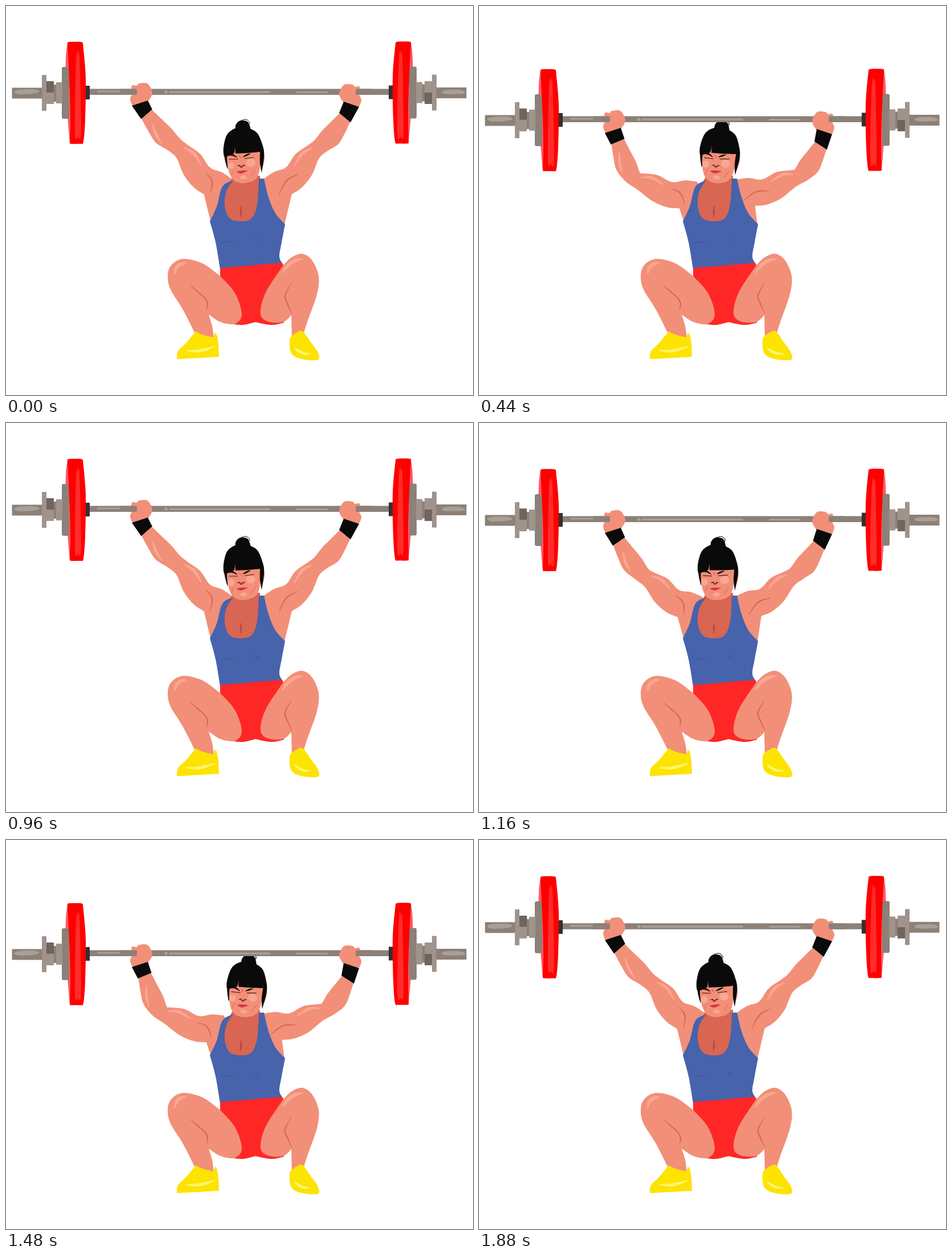
These frames come from a looping animation (820 px wide and 683 px high, 1920 ms). An HTML page with a canvas:

```html
<!DOCTYPE html>
<html lang="en">
<head>
<meta charset="utf-8">
<title>Weightlifter</title>
<style>
html, body { margin: 0; width: 100%; height: 100%; overflow: hidden; background: #fff; }
canvas { display: block; }
</style>
</head>
<body>
<canvas id="stage" width="820" height="683"></canvas>
<script>
const ctx = document.getElementById('stage').getContext('2d');
const LOOP = 1920, STEP = 40, PERIOD = 960, DROP = 48.8;

const SKIN = '#f28f78', SHADE = '#d86653', GLOW = '#f9a793', BLACK = '#0a0a0a';
const BLUE = '#4663ac', SHORTS = '#ff2726', SHOE = '#fde300', SHINE = '#fff46e';
const STEEL = '#8c8077', PALE = '#a0938c', DARK = '#6f655f', GLINT = '#a8a096';

const mix = (a, b, k) => a + (b - a) * k;
const mixPoint = (a, b, k) => [mix(a[0], b[0], k), mix(a[1], b[1], k)];

// "x y x y | x y": smooth runs, with a corner at each bar
const cache = {};
const parse = s => cache[s] || (cache[s] = s.split('|').map(run => {
  const n = run.trim().split(/\s+/).map(Number), pts = [];
  for (let i = 0; i < n.length; i += 2) pts.push([n[i], n[i + 1]]);
  return pts;
}));
const runsOf = shape => typeof shape === 'string' ? parse(shape) : shape;

function curve(path, p) {
  for (let i = 0; i < p.length - 1; i++) {
    const a = p[i - 1] || p[i], b = p[i], c = p[i + 1], d = p[i + 2] || c;
    path.bezierCurveTo(
      b[0] + (c[0] - a[0]) / 6, b[1] + (c[1] - a[1]) / 6,
      c[0] - (d[0] - b[0]) / 6, c[1] - (d[1] - b[1]) / 6, c[0], c[1]);
  }
}

function outline(shape) {
  const path = new Path2D();
  let last = null;
  for (const run of runsOf(shape)) {
    if (!last) path.moveTo(...run[0]);
    curve(path, last ? [last, ...run] : run);
    last = run[run.length - 1];
  }
  return path;
}

function fill(color, shape) {
  const path = outline(shape);
  path.closePath();
  ctx.fillStyle = color;
  ctx.fill(path);
}

function line(color, width, shape) {
  ctx.strokeStyle = color;
  ctx.lineWidth = width;
  ctx.lineCap = ctx.lineJoin = 'round';
  ctx.stroke(outline(shape));
}

// stroke that thins out at both ends
function brush(color, width, shape) {
  const p = runsOf(shape)[0], n = p.length - 1;
  const edge = sign => p.map((q, i) => {
    const u = p[Math.max(0, i - 1)], v = p[Math.min(n, i + 1)];
    const dx = v[0] - u[0], dy = v[1] - u[1];
    const w = sign * width / 2 * (i % n ? 1 : 0.35) / Math.hypot(dx, dy);
    return [q[0] - dy * w, q[1] + dx * w];
  });
  const back = edge(-1).reverse();
  fill(color, [edge(1), [back[0]], back]);
}

function box(color, x, y, w, h, r = 0) {
  ctx.fillStyle = color;
  ctx.beginPath();
  ctx.roundRect(x, y, w, h, r);
  ctx.fill();
}

function oval(color, x, y, rx, ry) {
  ctx.fillStyle = color;
  ctx.beginPath();
  ctx.ellipse(x, y, rx, ry, 0, 0, Math.PI * 2);
  ctx.fill();
}

// mirrors a drawing made for the left side
function flip(axis, dy, paint) {
  ctx.save();
  ctx.translate(axis, dy);
  ctx.scale(-1, 1);
  paint();
  ctx.restore();
}

// wrist, elbow and shoulder in the high and the low pose
const LEFT = {
  side: 1,
  high: [[247, 190], [300, 250], [385, 320]],
  low: [[243.5, 239], [272, 309], [379, 328]],
  cuff: [[221, 175], [249, 166]],
  chest: [400, 340], waist: [359, 377],
  crease: [[1.6, -1], [1.73, -3], [1.81, -11], [1.87, -24]]
};
const RIGHT = {
  side: -1,
  high: [[595, 196], [549, 251], [465, 319]],
  low: [[600, 246], [563, 303], [457, 324]],
  cuff: [[620, 177], [593, 168]],
  chest: [455, 350], waist: [489, 384],
  crease: [[1.52, -12], [1.68, -8], [1.8, -10], [1.97, -19]]
};
// distance along the arm (elbow at 1), thickness below and above the bone
const MUSCLE = [
  [0, 12, 12], [0.3, 17.5, 14], [0.6, 21, 16], [0.9, 14, 15.5], [1.1, 13.5, 17],
  [1.35, 28, 18.5], [1.6, 34, 11], [1.8, 32, 18], [2, 30, 20]
];

// maps arm coordinates (u along, v across) to the stage
function rig(arm, k) {
  const [w, e, s] = arm.high.map((p, i) => mixPoint(p, arm.low[i], k));
  const fore = Math.atan2(e[1] - w[1], e[0] - w[0]);
  const upper = Math.atan2(s[1] - e[1], s[0] - e[0]);
  return ([u, v]) => {
    const p = u < 1 ? mixPoint(w, e, u) : mixPoint(e, s, u - 1);
    const b = Math.min(1, Math.max(0, (u - 0.8) / 0.4));
    const a = mix(fore, upper, b * b * (3 - 2 * b));
    return [p[0] + Math.sin(a) * v * arm.side, p[1] - Math.cos(a) * v * arm.side];
  };
}

function drawArm(arm, k) {
  const at = rig(arm, k);
  const over = MUSCLE.map(([u, , up]) => at([u, up]));
  const under = MUSCLE.slice(0, -1).map(([u, down]) => at([u, -down])).reverse();
  fill(SKIN, [over, [arm.chest], [arm.waist], [under[0]], under]);
  brush(SHADE, 2.2, [arm.crease.map(at)]);
  brush(GLOW, 5.5, [[[1.08, 9], [1.26, 12], [1.48, 4]].map(at)]);
  if (arm === LEFT) brush(GLOW, 5, [[[0.24, -4], [0.46, -11], [0.71, -14]].map(at)]);
}

function drawBand(arm, k) {
  const at = rig(arm, k);
  const [a, b] = arm.cuff.map(([x, y]) => [x, y + DROP * k]);
  fill(BLACK, [[a], [b], [at([0, 13])], [at([0, -13])]]);
}

function torso() {
  fill(SHADE, '398 300 | 381 330 | 381 382 | 445 382 | 446 298');
  brush('#b44e40', 3.6, '413 351 412.5 361 412 370');
  fill(BLUE, '399 306 387 325 384 350 392 372 411 378 431 373 441 348 444 303 | 453 303 | 461 336 473 364 490 383 | 484 415 480 440 486 453 | 376 462 | 368 415 358 378 | 370 352 380 317 399 306');
  brush('#3d589f', 2, '378 415 390 414 401 411');
  brush('#3d589f', 2, '437 408 441 411 446 413');
}

function legs() {
  fill(SHORTS, '376 460 | 485 451 | 500 480 | 488 556 | 466 560 438 555 | 416 560 396 558 | 376 500');
  fill(SKIN, '376 474 345 452 312 444 291 454 284 473 289 498 310 532 333 577 | 365 584 | 362 562 356 542 | 377 555 402 558 414 541 402 504 376 474');
  fill(SKIN, '487 455 502 441 520 435 537 446 549 474 546 506 530 552 522 577 | 502 580 | 501 543 | 486 555 460 554 447 540 456 503 487 455');
  brush(SHADE, 2.2, '324 491 337 502 350 514 354 524 352 534');
  brush(SHADE, 2.2, '501 487 490 508 493 520 502 540');
  brush(GLOW, 6, '296 471 299 460 307 453 317 451');
  brush(GLOW, 6, '485 469 495 456 508 447 522 444');
}

function shoes() {
  fill(SHOE, '333 571 316 592 302 606 300 620 | 374 616 | 373 594 370 577 366 574 | 365 582 | 345 577 333 571');
  fill(SHOE, '503 578 498 586 501 610 520 620 548 621 547 607 535 590 521 571 511 573 503 578');
  brush(SHINE, 5, '316 605 335 606 350 603 367 598');
  brush(SHINE, 4.5, '506 600 514 606 523 610 535 611');
}

function face() {
  fill(SKIN, '448 258 453 258 454 267 452 279 448 289');
  fill(BLACK, '383 250 | 384 268 389 287 | 394 250');
  fill(SKIN, '388 250 | 389 280 398 304 417 311 440 302 447 275 447 246');
  oval(GLOW, 395, 280, 6, 6);
  oval(GLOW, 430, 275, 8, 7);
  oval(GLOW, 417, 301, 6, 3.5);
  brush(BLACK, 2.6, '393 262 399 262 406 266');
  brush(BLACK, 2.8, '416 265 422 262 429 259');
  line('#4a1c18', 1.2, '392 269 407 269');
  line('#4a1c18', 1.2, '419 268 435 266');
  line('#e03a3a', 1, '410 263 412 267');
  brush('#7b2c26', 2.4, '406 281 410 280 413 283 417 280 420 280');
  fill('#dc3142', '404 291 414 289 425 289 | 413 294 404 291');
  line(SHADE, 1, '431 299 434 293 438 288');
  line(SHADE, 1, '397 297 398 292 401 288');
}

function hair() {
  fill(BLACK, '388 264 383 264 382 248 388 226 402 215 418 213 440 222 451 246 453 264 449 293 | 446 276 446 256 | 425 258 403 259 | 402 247 | 400 259 388 264');
  fill(BLACK, '403 217 403 210 408 203 416 201 425 204 430 217');
  line(BLACK, 1, '404 209 409 203 421 199 428 205 424 209');
}

function head(k) {
  ctx.save();
  ctx.translate(416, 302);
  ctx.rotate(k * 7 * Math.PI / 180);
  ctx.translate(-416, -302);
  face();
  hair();
  ctx.restore();
}

const shaft = (x, w) => box(STEEL, x, 145.5, w, 10.5, 2);

function weight() {
  box('#342f30', 139, 140, 8, 24);
  fill('#fd5868', '108 64 105 92 105 150 112 241 | 125 241 | 125 64');
  box(STEEL, 98, 107, 13, 91, 3);
  fill('#ff0000', '108 65 111 63 131 63 135 65 | 140 125 139 200 136 238 132 242 | 114 242 112 240 | 113 200 112 150 108 65');
  fill('#ff2c2c', '125 85 129 90 132 220 126 230 121 220 123 92 125 85');
  box(STEEL, 84, 138, 5, 30);
  box(PALE, 88, 134, 11, 37);
  box(PALE, 63, 121, 8, 63);
  box(STEEL, 10.5, 143.5, 53, 19);
}

function nut(x, y, top, bottom) {
  box(top, x, y, 13, 20);
  box(bottom, x, y + 20, 13, 20);
}

function barbell() {
  shaft(145, 530);
  box(GLINT, 160, 148.5, 48, 3, 1.5);
  box(GLINT, 286, 149.5, 178, 3.5, 1.5);
  box(GLINT, 509, 150, 56, 3, 1.5);
  oval(GLINT, 281, 151, 3, 2.6);
  weight();
  flip(819, -0.5, weight);
  nut(71, 132, DARK, PALE);
  nut(735, 132, PALE, DARK);
  brush(GLINT, 8, '15 151 24 151 46 150 58 150');
  brush(GLINT, 7, '765 151.5 774 151 797 151 806 152');
}

function hand() {
  fill(SKIN, '222 175 218 163 223 151 220 145 222 139 229 140 234 136 248 136 256 148 256 157 249 168');
}

function hands() {
  hand();
  flip(842, 2, hand);
  shaft(200, 30);
  shaft(614, 30);
}

function draw(t) {
  const k = (1 - Math.cos(t / PERIOD * Math.PI * 2)) / 2;
  const sides = [LEFT, RIGHT];
  ctx.fillStyle = '#fff';
  ctx.fillRect(0, 0, 820, 683);
  sides.forEach(arm => drawArm(arm, k));
  torso();
  legs();
  shoes();
  head(k);
  ctx.save();
  ctx.translate(0, DROP * k);
  barbell();
  hands();
  ctx.restore();
  sides.forEach(arm => drawBand(arm, k));
}

const start = performance.now();
function tick() {
  const t = (performance.now() - start) % LOOP;
  draw(Math.floor(t / STEP) * STEP);
  requestAnimationFrame(tick);
}
tick();
</script>
</body>
</html>
```
